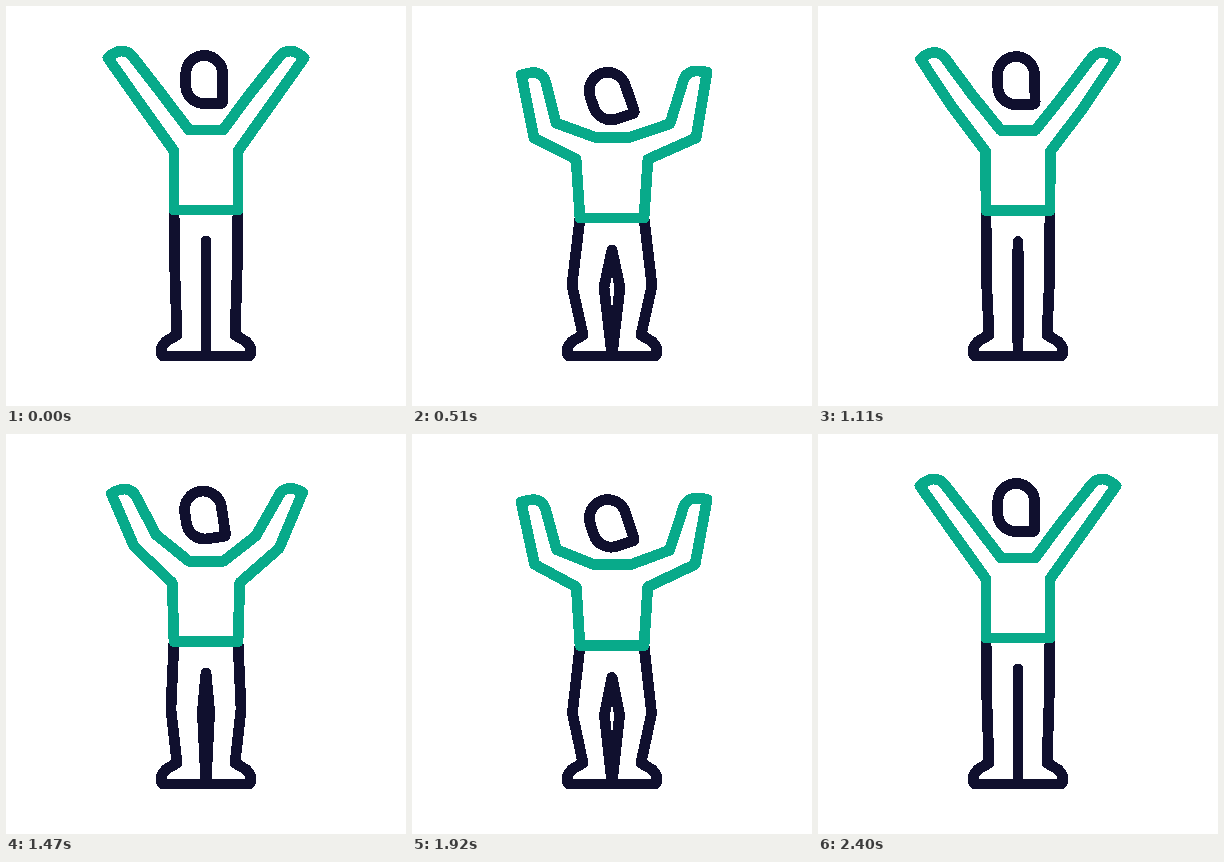
An HTML page that plays this animation: 400x400 px, repeating every 4430 ms.

```html
<!DOCTYPE html>
<html lang="en">
<head>
<meta charset="utf-8">
<title>Arm raises</title>
<style>
  html, body { margin: 0; width: 100%; height: 100%; overflow: hidden; background: #fff; }
  svg { display: block; width: 100%; height: 100%; shape-rendering: crispEdges; }
  path { fill: none; stroke: #10102e; stroke-width: 10.8; stroke-linecap: round; stroke-linejoin: round; }
  #shirt { stroke: #08aa8a; }
</style>
</head>
<body>
<svg viewBox="0 0 400 400">
  <path id="head" d="M214.5 97.5H198A18.3 18.3 0 0 1 179.7 79.2V68A18.5 18.5 0 0 1 216.7 68V95.3Q216.7 97.5 214.5 97.5Z"/>
  <path id="legs"/>
  <path id="seam"/>
  <path id="shirt"/>
</svg>
<script>
const LOOP = 4430, STEP = 30, HALF = 600, ACTIVE = 2400;
const [head, legs, seam, shirt] = ['head', 'legs', 'seam', 'shirt'].map(id => document.getElementById(id));

// Amount of squat: 0 standing, 1 lowest
function squat(t) {
  if (t >= ACTIVE) return 0;
  const x = t % (2 * HALF) / HALF;
  const u = x < 1 ? x : 2 - x;
  return u * u * (3 - 2 * u);
}

function draw(t) {
  const p = squat(t);
  const mix = (a, b) => +(a + (b - a) * p).toFixed(2);
  // Point between its standing and squatting places
  const pt = (x0, y0, x1, y1) => mix(x0, x1) + ' ' + mix(y0, y1) + ' ';

  const hemL = pt(168, 204, 168, 212.5);
  const hemR = pt(232, 204, 232, 212.5);

  shirt.setAttribute('d',
    'M' + hemL +
    'L' + pt(168, 145, 163.8, 153.8) +
    'L' + pt(133, 96, 121.3, 134.3) +
    'L' + pt(102, 52, 110, 70) +
    'C' + pt(110, 44, 121.7, 66.4) + pt(120, 42, 131.7, 66.5) + pt(127, 51, 134.5, 78.7) +
    'L' + pt(155, 87, 143.3, 119) +
    'L' + pt(183, 124, 183, 131.7) +
    'L' + pt(217, 124, 218, 131.7) +
    'L' + pt(243, 89, 259, 119.5) +
    'L' + pt(273, 51, 269.8, 80.8) +
    'C' + pt(280, 42, 272.5, 64.4) + pt(290, 44, 283.6, 65.3) + pt(298, 52, 294.8, 67) +
    'L' + pt(264, 100, 285.3, 134) +
    'L' + pt(232, 145, 236.2, 153.8) +
    'L' + hemR + 'Z');

  legs.setAttribute('d',
    'M' + hemL +
    'L' + pt(169, 272, 159.4, 280) +
    'L171 329L164 333C158 336 155 341 155 346Q155 350 158 350' +
    'H242Q245 350 245 346C245 341 242 336 236 333L229 329' +
    'L' + pt(231, 272, 240.6, 280) +
    'L' + hemR);

  seam.setAttribute('d',
    'M' + pt(200, 235, 200, 244.5) +
    'L' + pt(200, 275, 191.5, 281.5) +
    'L200 350' +
    'L' + pt(200, 275, 208.5, 281.5) + 'Z');

  head.setAttribute('transform',
    `translate(${mix(0, -0.9)} ${mix(0, 17.6)}) rotate(${mix(0, -20)} 198.5 73)`);
}

const start = performance.now();
function tick() {
  const t = (performance.now() - start) % LOOP;
  draw(Math.floor(t / STEP) * STEP);
  requestAnimationFrame(tick);
}
tick();
</script>
</body>
</html>
```
